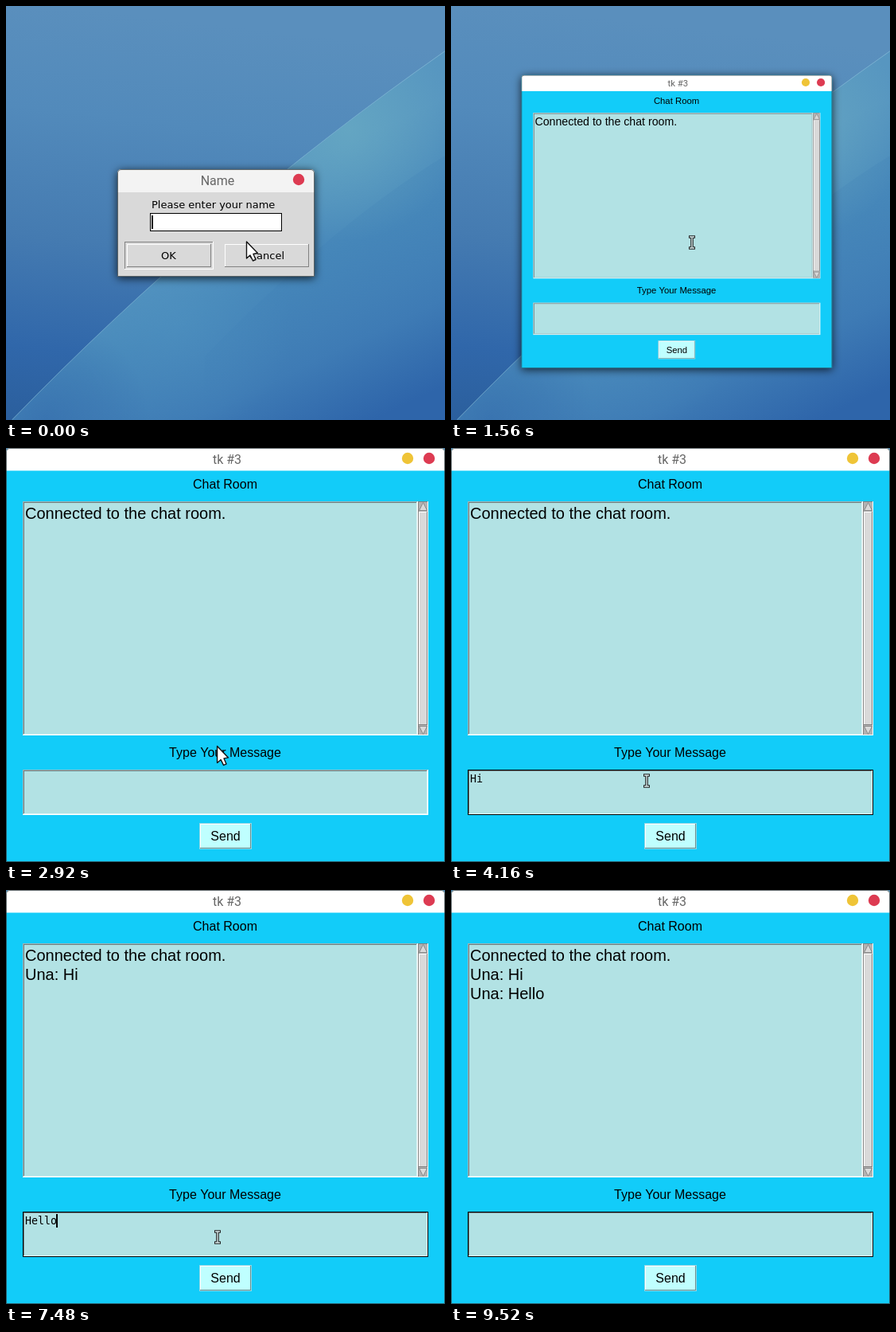
An HTML page with a canvas that plays this animation: 552 px wide and 520 px high, repeating every 9.56 s.

```html
<!DOCTYPE html>
<html lang="en">
<head>
<meta charset="utf-8">
<title>Chat room</title>
<style>
html, body { margin: 0; width: 100%; height: 100%; overflow: hidden; }
canvas { display: block; }
</style>
</head>
<body>
<canvas id="stage" width="552" height="520"></canvas>
<script>
const W = 552, H = 520, LOOP = 9560, STEP = 40;
const ctx = document.getElementById('stage').getContext('2d');
const SANS = 'px "Liberation Sans", Arial, sans-serif';
const UI = '13px "DejaVu Sans", sans-serif';
const MONO = '13.3px "DejaVu Sans Mono", monospace';
const TITLE = '16px Roboto, sans-serif';
const USER = 'Una';
const TIME = {
  closeDialog: 1300, dialogGone: 1420, open: 1492, opened: 1640,
  focus: 3420, press1: 5380, send1: 5480, press2: 8560, send2: 8680
};
const MOUSE = [
  [0, 303, 297], [2440, 303, 297], [3240, 246, 418], [4840, 246, 418],
  [5280, 278, 493], [5800, 278, 493], [6400, 266, 436], [7720, 266, 436],
  [8280, 278, 489], [9040, 278, 489], [9500, 368, 526], [9560, 368, 526]
];
const NAME_KEYS = [860, 980, 1100];
const HI_KEYS = [3720, 3860];
const HELLO_KEYS = [6840, 6960, 7090, 7210, 7350];

const clamp = v => Math.max(0, Math.min(1, v));
const typed = (word, keys, t) => word.slice(0, keys.filter(k => k <= t).length);

function mouseAt(t) {
  const i = MOUSE.findIndex((m, n) => n && t <= m[0]);
  const [t0, x0, y0] = MOUSE[i - 1], [t1, x1, y1] = MOUSE[i];
  const p = (t - t0) / (t1 - t0), e = p * p * (3 - 2 * p);
  return [x0 + (x1 - x0) * e, y0 + (y1 - y0) * e];
}

function rect(color, x, y, w, h) {
  ctx.fillStyle = color;
  ctx.fillRect(x, y, w, h);
}

function text(s, x, y, font, color = '#000', align = 'left') {
  ctx.font = font;
  ctx.fillStyle = color;
  ctx.textAlign = align;
  ctx.fillText(s, x, y);
}

function dot(color, x, y) {
  ctx.fillStyle = color;
  ctx.beginPath();
  ctx.arc(x, y, 7.2, 0, 7);
  ctx.fill();
}

function bevel(x, y, w, h, fill, topLeft, bottomRight) {
  rect(bottomRight, x, y, w, h);
  rect(topLeft, x, y, w - 1, h - 1);
  rect(fill, x + 1, y + 1, w - 2, h - 2);
}

function poly(points, fill, stroke, width = 1) {
  ctx.beginPath();
  points.forEach(p => ctx.lineTo(...p));
  ctx.closePath();
  ctx.fillStyle = fill;
  ctx.fill();
  ctx.strokeStyle = stroke;
  ctx.lineWidth = width;
  ctx.stroke();
}

function paint(gradient, stops) {
  stops.forEach(([at, color]) => gradient.addColorStop(at, color));
  ctx.fillStyle = gradient;
  ctx.fillRect(0, 0, W, H);
}

function glow(x, y, r, rgb, alpha) {
  paint(ctx.createRadialGradient(x, y, 0, x, y, r),
    [[0, `rgba(${rgb},${alpha})`], [1, `rgba(${rgb},0)`]]);
}

function wallpaper() {
  paint(ctx.createLinearGradient(60, 0, 0, H),
    [[0, '#5a8fbd'], [.25, '#528abb'], [.55, '#457bb1'], [.82, '#3067aa'], [1, '#2b5f9d']]);
  ctx.save();
  ctx.beginPath();
  ctx.moveTo(8, H);
  ctx.quadraticCurveTo(257, 263.5, W, 57);
  ctx.strokeStyle = 'rgba(150,205,225,.65)';
  ctx.lineWidth = 1.5;
  ctx.stroke();
  ctx.lineTo(W, H);
  ctx.clip();
  paint(ctx.createLinearGradient(300, 235, 440, 530),
    [[0, '#5796c0'], [.35, '#4788ba'], [.7, '#3e7bb5'], [1, '#2e65aa']]);
  glow(430, 155, 140, '110,178,196', .55);
  glow(220, 400, 140, '83,151,196', .35);
  glow(50, 520, 130, '50,105,170', .6);
  ctx.beginPath();
  ctx.moveTo(W, 188);
  ctx.quadraticCurveTo(410, 275, 250, 440);
  ctx.lineTo(250, H);
  ctx.lineTo(W, H);
  ctx.clip();
  paint(ctx.createLinearGradient(400, 270, 460, 370),
    [[0, 'rgba(40,105,170,.1)'], [1, 'rgba(40,105,170,0)']]);
  ctx.restore();
}

// Window body with rounded top corners and a drop shadow.
function frame(x, y, w, h, bar, barColor, body) {
  ctx.save();
  ctx.beginPath();
  ctx.roundRect(x, y, w, h, [5, 5, 0, 0]);
  ctx.shadowColor = 'rgba(0,0,0,.75)';
  ctx.shadowBlur = 11;
  ctx.shadowOffsetY = 2;
  ctx.fillStyle = body;
  ctx.fill();
  ctx.shadowColor = 'transparent';
  ctx.clip();
  rect(barColor, x, y, w, bar);
  ctx.strokeStyle = 'rgba(50,60,65,.75)';
  ctx.lineWidth = 2;
  ctx.stroke();
  ctx.restore();
}

function dialog(t) {
  ctx.save();
  ctx.globalAlpha = 1 - clamp((t - TIME.closeDialog) / (TIME.dialogGone - TIME.closeDialog));
  frame(140, 205, 248, 135, 29, '#f3f3f3', '#d9d9d9');
  text('Name', 266, 225, TITLE, '#666', 'center');
  dot('#dd3b52', 368, 218);
  text('Please enter your name', 183, 254, UI);
  bevel(181, 260, 166, 23, '#fff', '#000', '#000');
  const name = typed(USER, NAME_KEYS, t);
  text(name, 184, 276, UI);
  if (t < 210 || t >= 510) rect('#000', 183 + ctx.measureText(name).width, 263, 2, 17);
  bevel(149, 296, 112, 35, '#d9d9d9', '#828282', '#fff');
  bevel(152, 299, 106, 29, '#d9d9d9', '#fff', '#828282');
  bevel(275, 299, 106, 29, '#d9d9d9', '#fff', '#828282');
  text('OK', 204.5, 318, UI, '#000', 'center');
  text('Cancel', 328, 318, UI, '#000', 'center');
  ctx.restore();
}

function scrollbar() {
  bevel(518, 67, 13, 294, '#b3b3b3', '#828282', '#fff');
  bevel(519, 80, 11, 268, '#d9d9d9', '#fff', '#828282');
  poly([[524.5, 68.5], [529.5, 78.5], [519.5, 78.5]], '#d9d9d9', '#8a8a8a');
  poly([[524.5, 359.5], [529.5, 349.5], [519.5, 349.5]], '#d9d9d9', '#8a8a8a');
}

function chat(t, hover) {
  frame(0, 0, W, H, 28.5, '#fff', '#12ccf9');
  text('tk #3', 278, 20, TITLE, '#666', 'center');
  dot('#efc437', 505, 13);
  dot('#dd3b52', 532, 13);
  text('Chat Room', 275.5, 51, 16 + SANS, '#000', 'center');
  text('Type Your Message', 275.5, 388, 16 + SANS, '#000', 'center');

  bevel(21, 67, 497, 294, '#b2e2e4', '#a2b4b6', '#fff');
  bevel(22, 68, 495, 292, '#b2e2e4', '#697f82', '#d8f2f3');
  scrollbar();
  const lines = ['Connected to the chat room.'];
  if (t >= TIME.send1) lines.push(USER + ': Hi');
  if (t >= TIME.send2) lines.push(USER + ': Hello');
  lines.forEach((line, i) => text(line, 24, 89 + 24 * i, 20 + SANS));

  const focused = t >= TIME.focus;
  if (focused) bevel(21, 404, 510, 57, '#b2e2e4', '#000', '#000');
  else bevel(21, 404, 510, 57, '#b2e2e4', '#a2b4b6', '#fff');
  bevel(22, 405, 508, 55, '#b2e2e4', '#697f82', '#e4f8f8');
  const message = t < TIME.send1 ? typed('Hi', HI_KEYS, t)
    : t < TIME.send2 ? typed('Hello', HELLO_KEYS, t) : '';
  text(message, 24, 420, MONO);
  // The caret shows for 600 ms and hides for 300 ms after taking focus.
  if (focused && (t - TIME.focus) % 900 < 600)
    rect('#000', 23 + ctx.measureText(message).width, 407, 2, 17);

  const pressed = (t >= TIME.press1 && t < TIME.send1) || (t >= TIME.press2 && t < TIME.send2);
  const [light, dark] = pressed ? ['#6f8f90', '#fff'] : ['#fff', '#6f8f90'];
  bevel(243, 471, 66, 33, '#bfffff', '#8fd8e6', '#8fd8e6');
  bevel(244, 472, 64, 31, hover ? '#ececec' : '#bfffff', light, dark);
  text('Send', 276, 493, 16 + SANS, '#000', 'center');
}

function arrow(x, y) {
  ctx.save();
  ctx.translate(x - .5, y);
  ctx.lineJoin = 'round';
  poly([[0, -1], [0, 20], [4.5, 16], [8, 23], [11.5, 21.5], [8.5, 14.5], [14, 13.5]],
    '#fff', '#111', 1.4);
  ctx.restore();
}

function beam(x, y) {
  for (const [color, width, grow] of [['#222', 3.6, 1], ['#d5e6e7', 1.4, 0]]) {
    ctx.strokeStyle = color;
    ctx.lineWidth = width;
    ctx.beginPath();
    for (const end of [-7, 7]) {
      ctx.moveTo(x - 3 - grow, y + end);
      ctx.lineTo(x + 3 + grow, y + end);
    }
    ctx.moveTo(x, y - 7);
    ctx.lineTo(x, y + 7);
    ctx.stroke();
  }
}

function draw(t) {
  const [x, y] = mouseAt(t);
  const chatOpen = t >= TIME.open;
  const hover = x > 243 && x < 309 && y > 471 && y < 504;
  wallpaper();
  if (t < TIME.dialogGone) dialog(t);
  if (chatOpen) {
    // The window grows out of the pointer position.
    const p = clamp((t - TIME.open) / (TIME.opened - TIME.open));
    const scale = 1 - (1 - p) ** 2;
    ctx.save();
    ctx.translate(303 * (1 - scale), 297 * (1 - scale));
    ctx.scale(scale, scale);
    chat(t, hover);
    ctx.restore();
  }
  const overText = chatOpen && (y < 361 || (y > 404 && y < 461));
  (overText ? beam : arrow)(x, y);
}

const start = performance.now();
function tick() {
  const t = (performance.now() - start) % LOOP;
  draw(Math.floor(t / STEP) * STEP);
  requestAnimationFrame(tick);
}
tick();
</script>
</body>
</html>
```
